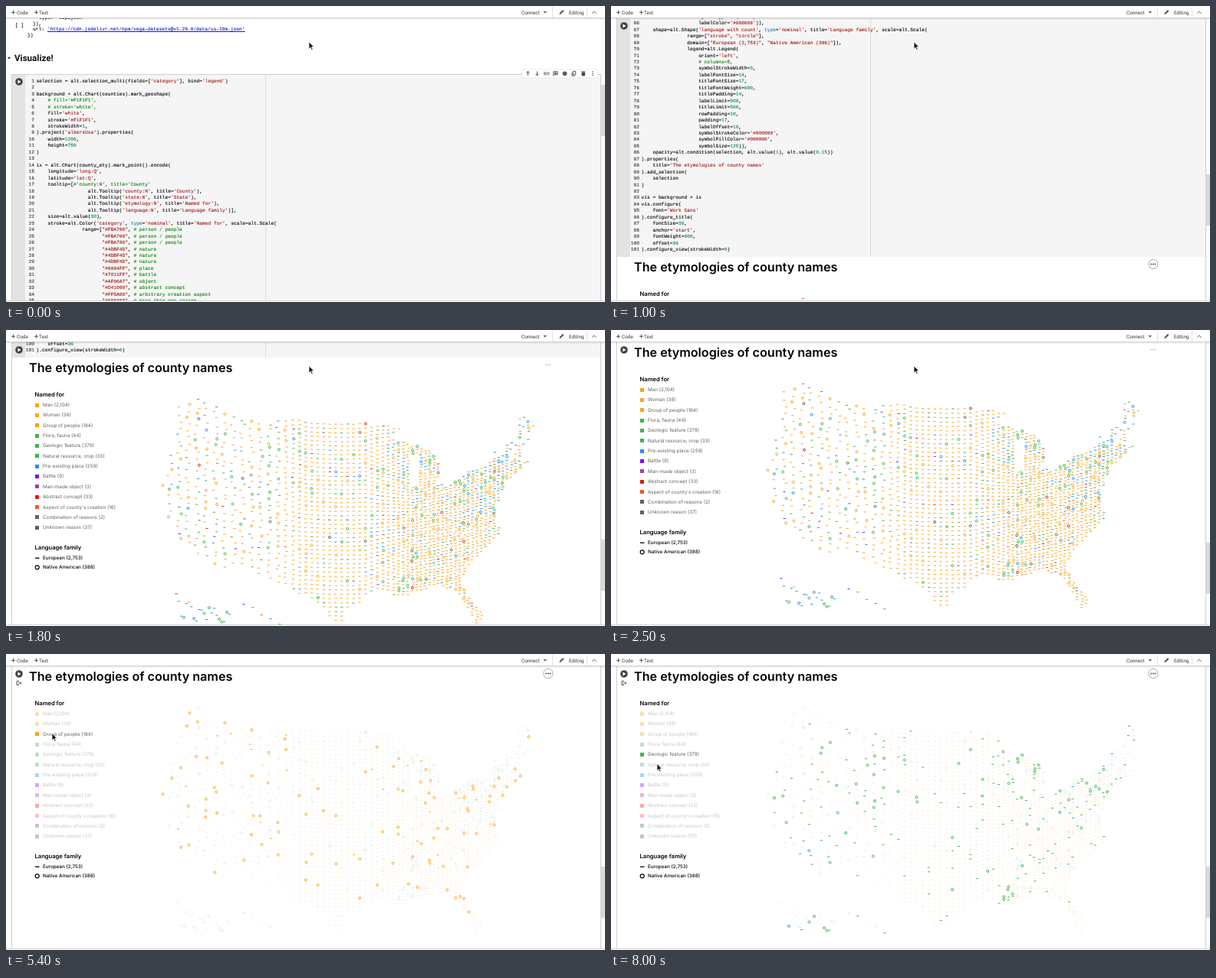
Write an HTML page with a canvas that moves like this. It is 781 by 387 pixels and loops after 8100 ms.

```html
<!DOCTYPE html>
<html lang="en">
<head>
<meta charset="utf-8">
<title>Notebook: county names</title>
<style>
html, body { margin: 0; width: 100%; height: 100%; overflow: hidden; background: #fff; }
#stage { position: relative; width: 781px; height: 387px; overflow: hidden; background: #fff; text-rendering: geometricPrecision; }
#stage *, #doc { position: absolute; }
#stage pre, #stage pre * { position: static; margin: 0; }
#doc { left: 0; top: 0; width: 781px; height: 1324px; }
.t { white-space: pre; line-height: 10px; color: #000; }
.ui { font: 400 6.4px/10px Roboto, sans-serif; color: #333; }
.sans { font: 400 6.3px/10px Inter, sans-serif; }
.bold { font-weight: 600; }
.mid { font-weight: 500; }
.mono { font: 6.22px/8.457px "Liberation Mono", monospace; color: #000; -webkit-text-stroke: .1px; }
#stage pre.mono { position: absolute; top: 94.8px; }
.s { color: #a31515; } .n { color: #09885a; } .c { color: #008000; } .k { color: #267f99; }
.cell { left: 7px; top: 89px; width: 767px; height: 1240px; border: 1px solid #d0d0d0; background: #fff; }
.code { left: 8px; top: 90px; width: 767px; height: 863px; background: #f5f5f5; }
.gutter { left: 8px; top: 90px; width: 17px; height: 863px; background: #e3e3e3; }
.ruler { left: 338px; top: 90px; width: 1px; height: 863px; background: #dcdcdc; }
.head { left: 0; top: 0; width: 781px; height: 15px; background: #fff; border-bottom: 1px solid #d4d4d4; box-shadow: 0 1px 2px #0002; }
.foot { left: 0; top: 385px; width: 781px; height: 2px; background: #fff; border-top: 1px solid #d0d0d0; }
.track { left: 776px; top: 16px; width: 5px; height: 369px; background: #fafafa; }
#thumb { left: 776px; width: 5px; height: 67px; background: #d9d9d9; }
svg { overflow: visible; left: 0; top: 0; }
</style>
</head>
<body>
<div id="stage">
  <div id="doc">
    <div class="cell"></div><div class="code"></div><div class="gutter"></div><div class="ruler"></div>
    <pre id="nums" class="mono" style="left:20px;width:17px;text-align:right;color:#333"></pre>
    <pre id="code" class="mono" style="left:39.5px"></pre>
    <canvas id="map" width="781" height="387" style="left:0;top:937px"></canvas>
    <svg width="781" height="1324" fill="none" stroke="#444" stroke-width=".9">
      <path d="M2 67h4l-2 2.6z" fill="#222" stroke="none"/>
      <rect x="673" y="83" width="99" height="11" rx="1" fill="#fff" stroke="#ddd" stroke-width=".6"/>
      <path d="M680.5 91v-5.5m-2 2 2-2 2 2M692.5 85.5v5.5m-2-2 2 2 2-2"/>
      <path d="M704 86.8h-1a1.5 1.5 0 0 0 0 3h1m1.5-3h1a1.5 1.5 0 0 1 0 3h-1m-2-1.5h2.5"/>
      <path d="M713.8 85.8h5.4v4h-4l-1.4 1.3zM715 87.2h3m-3 1.3h3"/>
      <circle cx="728.5" cy="88.3" r="1.9" stroke-width="1.4"/>
      <path d="M728.5 85v6.6m-3.3-3.3h6.6m-5.5-2.2 4.4 4.4m0-4.4-4.4 4.4" stroke-width=".6"/>
      <path d="M738 87v4.3h3.7M739.3 85.4h3.4v4.5h-3.4z"/>
      <path d="M751 87h3.6v4h-3.6zM750.2 85.8h5" fill="#444"/>
      <path d="M765 85.3v1.2m0 1.2v1.2m0 1.2v1.2" stroke-width="1.2"/>
      <path d="M38 1215.2h5.5" stroke="#000" stroke-width="1.3"/>
      <circle cx="40.7" cy="1227.3" r="2.5" stroke="#000" stroke-width="1.2"/>
      <g id="menu"><circle id="ring" cx="707" cy="962.5" r="6.2" fill="#fff" stroke="#888" stroke-width=".7"/>
        <path d="M703.5 962.5h1.6m1.1 0h1.6m1.1 0h1.6" stroke="#333" stroke-width="1.5"/></g>
    </svg>
  </div>
  <svg width="781" height="387">
    <g id="play"><circle r="4.8" fill="#444"/><path d="M-1.5-2.4 2.5 0-1.5 2.4z" fill="#fff"/></g>
    <path id="out" d="M17 35.5h-3v5h3M15.5 38h4.5m-1.5-1.5 1.5 1.5-1.5 1.5" fill="none" stroke="#444" stroke-width=".9"/>
  </svg>
  <div class="track"></div><div id="thumb"></div>
  <div class="foot"></div>
  <div class="head" id="head">
    <svg width="781" height="16" fill="none" stroke="#444" stroke-width=".9">
      <path d="M7 8.3h5m-2.5-2.5v5M37 8.3h5m-2.5-2.5v5M764.5 9.7l2.5-2.5 2.5 2.5"/>
      <path d="M700.5 7.2h4.6l-2.3 2.4z" fill="#444" stroke="none"/>
      <path d="M721.5 11l.5-2 4-4 1.5 1.5-4 4z" fill="#555" stroke="none"/>
      <path d="M712.5 1v14M757.5 1v14" stroke="#ddd"/>
    </svg>
  </div>
  <svg id="cursor" width="10" height="14"><path d="M0 0v9.2l2.1-2 1.5 3.3 1.5-.7-1.5-3.2h2.9z" fill="#111" stroke="#fff" stroke-width=".7"/></svg>
</div>
<script>
const $ = id => document.getElementById(id);
const doc = $('doc'), ctx = $('map').getContext('2d');
const TOP = 937, LOOP = 8100, ROW = 13.35;

function text(parent, x, cy, str, cls, size) {
  const e = document.createElement('div');
  e.className = 't ' + cls;
  e.textContent = str;
  e.style.left = x + 'px';
  e.style.top = cy - 5 + 'px';
  if (size) e.style.fontSize = size + 'px';
  parent.append(e);
  return e;
}

const cats = [
  ['Man (2,104)', '#FBA31A'], ['Woman (38)', '#FBA31A'], ['Group of people (184)', '#FBA31A'],
  ['Flora, fauna (44)', '#3DB54A'], ['Geologic feature (379)', '#3DB54A'], ['Natural resource, crop (33)', '#3DB54A'],
  ['Pre-existing place (259)', '#1E90FF'], ['Battle (9)', '#7011FF'], ['Man-made object (3)', '#A83CB0'],
  ['Abstract concept (33)', '#D42010'], ["Aspect of county's creation (16)", '#F5562A'],
  ['Combination of reasons (2)', '#606060'], ['Unknown reason (37)', '#606060']
];

// Code cell
const pad = (n, lines) => lines.map(l => ' '.repeat(n) + l);
const tones = [...Array(3).fill(['#FBA700', 'person / people']), ...Array(3).fill(['#4DBF4D', 'nature']),
  ['#0094FF', 'place'], ['#7011FF', 'battle'], ['#AF00A7', 'object'], ['#D41000', 'abstract concept'],
  ['#FF5A00', 'arbitrary creation aspect'], ['#686868', 'more than one reason']].map(([hex, note]) => `"${hex}", # ${note}`);
const legend = [...pad(16, ['legend=alt.Legend(']), ...pad(20, ["orient='left',", '# columns=5,', 'symbolStrokeWidth=3,',
  'labelFontSize=14,', 'titleFontSize=17,', 'titleFontWeight=600,', 'titlePadding=14,', 'labelLimit=500,', 'titleLimit=500,',
  'rowPadding=10,', 'padding=17,', 'labelOffset=10,'])];
const lines = [
  "selection = alt.selection_multi(fields=['category'], bind='legend')", '',
  'background = alt.Chart(counties).mark_geoshape(',
  ...pad(4, ["# fill='#F1F1F1',", "# stroke='white',", "fill='white',", "stroke='#F1F1F1',", 'strokeWidth=1,']),
  ").project('albersUsa').properties(", ...pad(4, ['width=1200,', 'height=750']), ')', '',
  'ix = alt.Chart(county_ety).mark_point().encode(',
  ...pad(4, ["longitude='long:Q',", "latitude='lat:Q',", "tooltip=[#'county:N', title='County'"]),
  ...pad(18, ["alt.Tooltip('county:N', title='County'),", "alt.Tooltip('state:N', title='State'),",
    "alt.Tooltip('etymology:N', title='Named for'),", "alt.Tooltip('language:N', title='Language family')],"]),
  ...pad(4, ['size=alt.value(30),', "stroke=alt.Color('category', type='nominal', title='Named for', scale=alt.Scale("]),
  ...pad(16, ['range=[' + tones[0]]), ...pad(23, [...tones.slice(1), '"#686868"], # unknown']),
  ...pad(16, [`domain=["${cats[0][0]}",`]),
  ...pad(24, cats.slice(1).map(([c], i) => `"${c}"` + (i < 11 ? ',' : ']),'))),
  ...legend, ...pad(20, ['symbolSize=125,', 'symbolOpacity=1,', "symbolType='square',", "labelColor='#686868')),"]),
  "    shape=alt.Shape('language with count', type='nominal', title='Language family', scale=alt.Scale(",
  ...pad(16, ['range=["stroke", "circle"],', 'domain=["European (2,753)", "Native American (388)"]),']),
  ...legend, ...pad(20, ["symbolStrokeColor='#000000',", "symbolFillColor='#000000',", 'symbolSize=125)),']),
  '    opacity=alt.condition(selection, alt.value(1), alt.value(0.15))', ').properties(',
  "    title='The etymologies of county names'", ').add_selection(', '    selection', ')', '',
  'vis = background + ix', 'vis.configure(', "    font='Work Sans'", ').configure_title(',
  ...pad(4, ['fontSize=36,', "anchor='start',", 'fontWeight=600,', 'offset=36']), ').configure_view(strokeWidth=0)'
];
const paint = l => l.replace(/(#.*$)|("[^"]*"|'[^']*')|\b(\d[\d.]*)\b|\b(type)(?==)/g,
  (m, c, s, n) => `<span class="${c ? 'c' : s ? 's' : n ? 'n' : 'k'}">${m}</span>`);
$('code').innerHTML = lines.map(paint).join('\n');
$('nums').textContent = lines.map((_, i) => i + 1).join('\n');

// Cell above, heading and toolbar
[[43, 17, "type: 'topojson'"], [35, 24.5, '}),'], [35, 32, 'url: '], [28, 39.5, '})'], [12, 26.5, '[ ]']]
  .forEach(a => text(doc, ...a, 'mono'));
const link = text(doc, 54, 32, "'https://cdn.jsdelivr.net/npm/vega-datasets@v1.29.0/data/us-10m.json'", 'mono');
link.style.cssText += 'color:#1414d8;text-decoration:underline';
text(doc, 11, 67.5, 'Visualize!', 'ui', 11.6).style.cssText += 'color:#111;font-weight:700';
[[14, 'Code'], [43, 'Text'], [672, 'Connect'], [734, 'Editing']].forEach(([x, s]) => text($('head'), x, 8.5, s, 'ui'));

// Chart title and legend
text(doc, 30, TOP + 29, 'The etymologies of county names', 'sans bold', 16.15);
text(doc, 37.5, TOP + 65, 'Named for', 'sans bold', 7.6);
text(doc, 37.5, TOP + 265, 'Language family', 'sans bold', 7.6);
text(doc, 48, TOP + 278.3, 'European (2,753)', 'sans mid');
text(doc, 48, TOP + 290.3, 'Native American (388)', 'sans mid');
const rows = cats.map(([name, col], i) => {
  const y = TOP + 78 + i * ROW;
  const box = text(doc, 38, y, '', '');
  box.style.cssText += `top:${y - 2.5}px;width:5px;height:5px;background:${col}`;
  const label = text(doc, 48, y, name, 'sans');
  label.style.color = '#606060';
  return [box, label];
});

// Map: counties on a grid that follows the parallels and tightens eastwards
let seed = 11;
const rnd = () => (seed = (seed * 1664525 + 1013904223) >>> 0) / 4294967296;
const jitter = d => (rnd() - .5) * d;
const land = new Path2D('M226 72L250 67 290 88 340 96 440 98 516 107 500 121 556 137 568 160 562 180 582 182 602 164' +
  ' 628 156 638 138 660 127 672 90 690 106 672 142 682 152 652 178 636 222 646 243 602 290 593 310 621 352 617 369' +
  ' 588 321 562 314 516 329 482 321 440 352 437 371 420 354 404 334 366 318 314 292 268 290 216 242 203 188 218 130z');
const lake = new Path2D('M527 145L538 142 537 182 528 182z');
const within = (path, x, y) => ctx.isPointInPath(path, x, y);

// Category odds are the legend counts, weighted by region
const counts = cats.map(([c]) => +c.match(/\(([\d,]+)/)[1].replace(',', ''));
const boost = {
  west: { 0: .45, 2: 1.4, 4: 1.2, 6: .6 },
  plains: { 2: .7, 4: .4, 6: .3 },
  east: { 2: .5, 4: .5, 6: .5 },
  lakes: { 4: 2 },
  northeast: { 0: .5, 4: 1.2, 6: 2.8 },
  islands: { 0: 0, 2: 0, 4: 2, 6: 2 }
};
const ringOdds = { 0: .012, 2: .85, 3: .35, 4: .35, 5: .4, 6: .12, 9: .25, 12: .5 };
const zone = (x, y) => x < 360 ? 'west' : x > 595 && y < 225 ? 'northeast' : x > 495 && y < 180 ? 'lakes' : x < 480 ? 'plains' : 'east';
const pts = [];
function place(x, y, region) {
  const w = counts.map((n, i) => n * (boost[region][i] ?? 1));
  let r = rnd() * w.reduce((a, b) => a + b), cat = 0;
  while (cat < 12 && (r -= w[cat]) > 0) cat++;
  pts.push({ x, y, cat, ring: rnd() < (ringOdds[cat] || 0) });
}
const ramp = (x, a, b) => Math.max(0, Math.min(1, (x - a) / (b - a)));
for (let gx = 202; gx < 695;) {
  const p = ramp(gx, 335, 385), e = ramp(gx, 470, 530);
  const dx = 11.8 - 4 * p - 2.2 * e, dy = 8.6 - 2.9 * p - 1.7 * e, j = 6 - 5 * p + 1.2 * e;
  for (let k = -50; k < 50; k++) {
    const x = gx + jitter(j), y = 240 + k * dy - .00083 * (gx - 440) ** 2 + jitter(j * .7);
    const sparse = x > 625 && y < 150 && rnd() < .5;
    if (within(land, x, y) && !within(lake, x, y) && !sparse) place(x, y, zone(x, y));
  }
  gx += dx;
}
// Alaska, then Hawaii
for (let i = 0; i < 22; i++) place(222 + i * 3.3, 342 + i * .6 + jitter(36 - i), 'islands');
for (let i = 0; i < 5; i++) place(310 + i * 11.7, 338 + i * 7 + jitter(6), 'islands');

let shown;
function select(sel) {
  if (sel === shown) return;
  shown = sel;
  const on = c => sel < 0 || c === sel;
  rows.forEach((r, i) => r.forEach(e => e.style.opacity = on(i) ? 1 : .36));
  ctx.clearRect(0, 0, 781, 387);
  for (const { x, y, cat, ring } of pts) {
    ctx.globalAlpha = on(cat) ? 1 : .15;
    ctx.strokeStyle = cats[cat][1];
    ctx.lineWidth = ring ? 1 : .95;
    ctx.beginPath();
    if (ring) ctx.arc(x, y, 1.5, 0, 7);
    else { ctx.moveTo(x - 1.6, y); ctx.lineTo(x + 1.6, y); }
    ctx.stroke();
  }
}

const lerp = (a, b, u) => a + (b - a) * u;
const easeOut = u => 1 - (1 - u) ** 2;

const stops = [[0, 0], [1000, 625], [1800, 917], [2200, TOP]];
function scrollAt(t) {
  const i = stops.findIndex(([at]) => at > t);
  if (i < 0) return TOP;
  const [t0, s0] = stops[i - 1], [t1, s1] = stops[i];
  return lerp(s0, s1, ramp(t, t0, t1));
}

// The pointer walks down the legend, one click per row
const clickAt = i => 3400 + 950 * i;
function pointer(t) {
  const u = ramp(t, 2600, 3250);
  let y = lerp(47, 77, u);
  for (let i = 1; i <= 5; i++) y += ROW * easeOut(ramp(t, clickAt(i) - 450, clickAt(i) - 100));
  return [lerp(395, 60, u), y];
}

function frame(now) {
  const t = Math.floor(now % LOOP / 100) * 100;
  const s = scrollAt(t), [mx, my] = pointer(t);
  const hover = t >= 2800, faint = t >= 1300 && !hover;
  doc.style.transform = `translateY(${-s}px)`;
  $('thumb').style.top = 103 + s * .187 + 'px';
  $('play').setAttribute('transform', `translate(17 ${Math.max(26, 99 - s)})`);
  $('out').style.opacity = hover ? 1 : 0;
  $('menu').style.opacity = faint ? .3 : 1;
  $('ring').style.opacity = faint ? 0 : 1;
  $('cursor').style.transform = `translate(${mx}px,${my}px)`;
  select(Math.max(-1, Math.floor((t - clickAt(0)) / 950)));
  requestAnimationFrame(frame);
}
requestAnimationFrame(frame);
</script>
</body>
</html>
```
